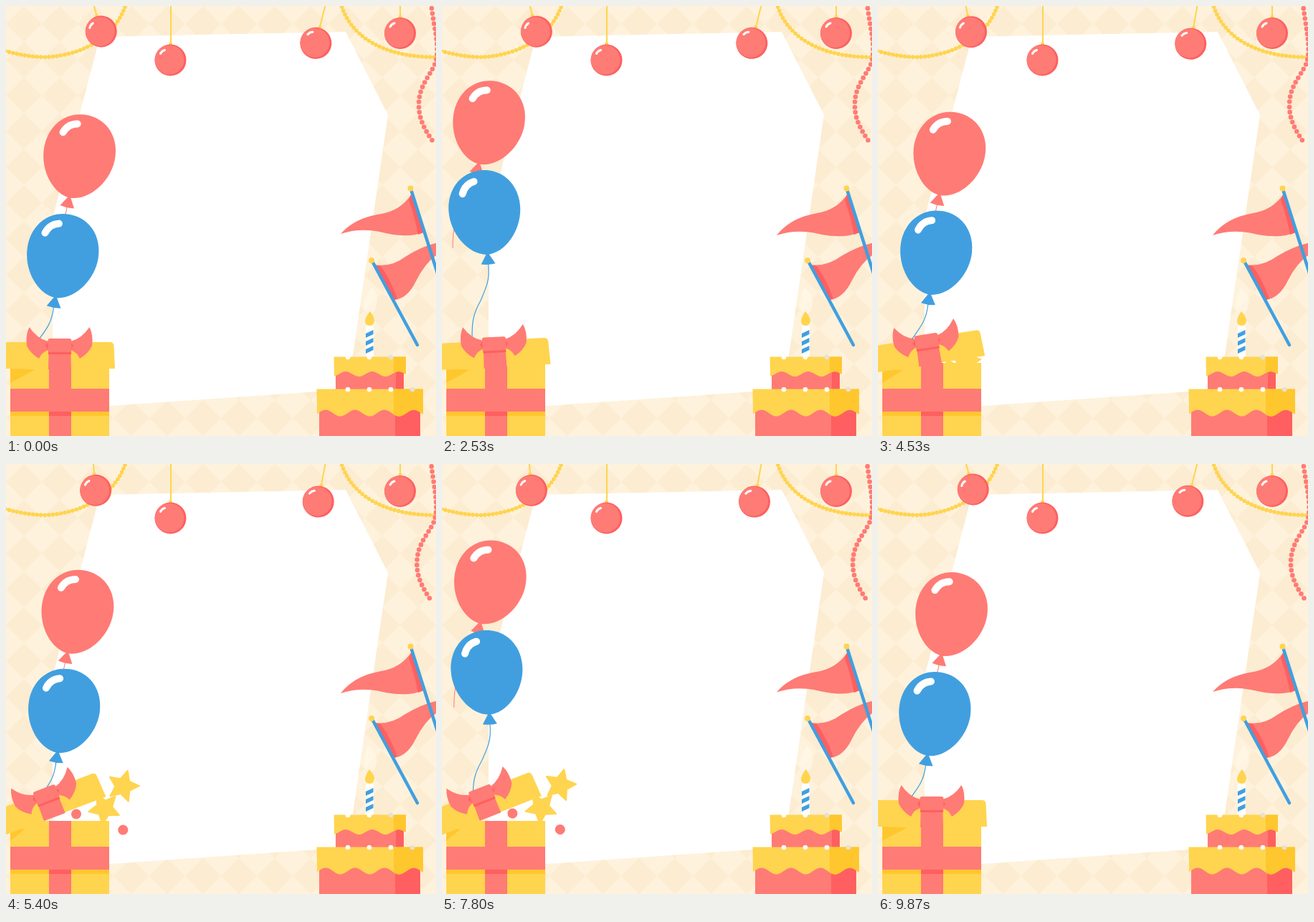
Animation, 600 px wide and 600 px high, one loop 9.94 s. Source, as an HTML page:

```html
<!DOCTYPE html>
<html lang="en">
<head>
<meta charset="utf-8">
<title>Party frame</title>
<style>
html, body { margin: 0; width: 100%; height: 100%; overflow: hidden; background: #fef2dc; }
svg { display: block; width: 100vw; height: 100vh; }
.r { fill: #ff7b75; } .rd { fill: #ff5f60; }
.y { fill: #ffd44f; } .yd { fill: #ffc72e; }
.b { fill: #419fe0; } .w { fill: #fff; }
.line { fill: none; stroke-linecap: round; stroke-linejoin: round; }
.gold { stroke: #ffd44f; } .blue { stroke: #419fe0; } .red { stroke: #ff7b75; } .white { stroke: #fff; }
</style>
</head>
<body>
<svg viewBox="0 0 600 600" preserveAspectRatio="none">
  <defs>
    <pattern id="diamonds" width="50" height="50" patternUnits="userSpaceOnUse">
      <path d="M25 0L50 25L25 50L0 25Z" fill="#fcecd1"/>
    </pattern>
    <g id="ball">
      <rect class="y" x="-2.5" y="-25" width="5" height="6" rx="2"/>
      <circle class="rd" r="22"/>
      <circle class="r" cx="-1.4" cy="-.3" r="20.4"/>
      <path class="line white" stroke-width="3" d="M-14 -9Q-12 -13 -8 -14"/>
    </g>
    <g id="body">
      <path d="M0 -59C29 -59 50 -36 50 -5C50 27 26 58 0 59C-26 58 -50 27 -50 -5C-50 -36 -29 -59 0 -59Z"/>
      <path d="M0 55L10 72Q0 74 -10 72Z"/>
      <path class="line white" stroke-width="10" d="M-29 -28Q-25 -41 -12 -44"/>
    </g>
    <path id="star" class="y" stroke="#ffd44f" stroke-width="2" stroke-linejoin="round"/>
    <clipPath id="shadeSide"><rect x="541" y="480" width="60" height="120"/></clipPath>
  </defs>

  <rect width="600" height="600" fill="#fef2dc"/>
  <rect width="600" height="600" fill="url(#diamonds)"/>
  <path class="w" d="M131 43L474 36L533 152L477 535L65 563.5V296Z"/>

  <g class="line gold">
    <g id="garland">
      <path d="M168 -4C153 42 112 66 62 71C42 72 20 69 -3 62"/>
      <path d="M467 -4C480 42 525 72 603 71.5"/>
    </g>
    <path stroke-width="2" d="M230 -2V52M550 -2V16"/>
  </g>
  <use href="#ball" x="229.5" y="75.5"/>
  <use href="#ball" x="550" y="38"/>
  <g id="swingL"><path class="line gold" stroke-width="2" d="M0 0V20"/><use href="#ball" y="42"/></g>
  <g id="swingR"><path class="line gold" stroke-width="2" d="M0 0V34"/><use href="#ball" y="56.5"/></g>

  <path id="beads" class="line red" stroke-width="6.6" stroke-dasharray="0 7.2"
    d="M593 -4C597 30 606 58 599 80C590 100 576 112 576 138C576 160 586 175 597 191"/>

  <path id="flagB" class="r"/>
  <path class="rd" d="M514 361L541 410L546 408.5Q538 384 523 363Z"/>
  <path class="line blue" stroke-width="4.5" d="M512 358L574 473"/>
  <circle class="y" cx="510" cy="355" r="4"/>
  <path id="flagA" class="r"/>
  <path class="rd" d="M566 262L582.5 316L575 319Q570 293 562 271Z"/>
  <path class="line blue" stroke-width="4.5" d="M566 259L603 376"/>
  <circle class="y" cx="564.5" cy="254.5" r="4"/>

  <path id="glow" fill="#fff6e6" opacity=".8"/>
  <path id="flame" class="y"/>
  <rect class="w" x="502" y="446" width="11" height="44" rx="2"/>
  <g id="stripes" class="b"></g>
  <g id="cake">
    <rect class="r" x="460" y="505" width="95" height="31"/>
    <rect class="rd" x="544" y="505" width="11" height="31"/>
    <rect class="r" x="437" y="560" width="141" height="42"/>
    <rect class="rd" x="543" y="560" width="35" height="42"/>
  </g>

  <g id="red">
    <path class="line red" d="M0 73C1 92 -5 110 -10 130C-15 148 -14 160 -9 181"/>
    <use href="#body" class="r"/>
  </g>
  <g id="blue">
    <path class="line blue" stroke-width="1.2" d="M0 73C1 95 -6 106 -14 122C-26 140 -30 152 -30 190"/>
    <use href="#body" class="b"/>
  </g>

  <g id="pops">
    <use href="#star"/><use href="#star"/>
    <circle class="r" r="7"/><circle class="r" r="7"/>
  </g>
  <rect class="y" x="6" y="498" width="138" height="104"/>
  <rect class="yd" x="6" y="565" width="138" height="7"/>
  <rect class="r" x="60" y="498" width="31" height="104"/>
  <rect class="rd" x="60" y="565" width="31" height="7"/>
  <rect class="r" x="6" y="534" width="138" height="32"/>
  <path id="shade" class="yd"/>
  <g id="lid">
    <path class="y" d="M1 -38H147Q152 -38 152.5 -33L154 -1H0V-37Z"/>
    <path class="r" d="M62 -38H92L93 0H61Z"/>
    <g id="wing">
      <path class="r" d="M61 -39Q45 -43 34.5 -59Q29 -48 31 -33Q36 -22 48 -15Q52 -24 61 -27Z"/>
      <path class="rd" d="M61 -38L57 -33L61 -27Z"/>
    </g>
    <use href="#wing" transform="translate(153) scale(-1 1)"/>
    <rect class="rd" x="61" y="-26" width="32" height="5"/>
    <rect class="r" x="60.5" y="-43" width="33" height="19" rx="3"/>
  </g>
</svg>
<script>
const $ = id => document.getElementById(id);
const LOOP = 4970, CYCLE = 2390;
const lerp = (a, b, k) => a + (b - a) * k;
const ease = u => (1 - Math.cos(Math.PI * Math.min(1, Math.max(0, u)))) / 2;
const set = (el, attrs) => { for (const k in attrs) el.setAttribute(k, attrs[k]); };
const place = (el, x, y, deg = 0) => set(el, { transform: `translate(${x} ${y}) rotate(${deg})` });

function add(parent, tag, attrs) {
  const el = document.createElementNS('http://www.w3.org/2000/svg', tag);
  set(el, attrs);
  parent.append(el);
}

// Rises to 1, rests there, and is back at 0 when the cycle ends.
const pulse = (c, delay, rise) => ease((c - delay) / rise) * ease((CYCLE - c) / rise);

function starPath() {
  let d = '';
  for (let i = 0; i < 10; i++) {
    const r = i % 2 ? 11 : 22.5, a = (i - 2.5) * Math.PI / 5;
    d += `${i ? 'L' : 'M'}${r * Math.cos(a)} ${r * Math.sin(a)}`;
  }
  return d + 'Z';
}

// Frosting with a wavy lower edge that is highest at x = crest.
function frosting(x0, x1, top, mid, amp, crest, period) {
  let d = `M${x0} ${top}H${x1}`;
  for (let x = x1; x >= x0; x -= 2)
    d += `L${x} ${mid - amp * Math.cos((x - crest) / period * 2 * Math.PI)}`;
  d += 'Z';
  add($('cake'), 'path', { d, class: 'y' });
  add($('cake'), 'path', { d, class: 'yd', 'clip-path': 'url(#shadeSide)' });
}

function cherries(count, y) {
  for (let i = 0; i < count; i++)
    add($('cake'), 'circle', { cx: 477 + 30 * i, cy: y, r: 3.3, fill: i === count - 1 ? '#e3e2d6' : '#fff' });
}

function build() {
  set($('star'), { d: starPath() });
  for (const p of [...$('garland').children]) {
    const dots = p.cloneNode();
    set(p, { 'stroke-width': 2 });
    set(dots, { 'stroke-width': 5.6, 'stroke-dasharray': '0 5.6' });
    $('garland').append(dots);
  }
  for (let y = 457; y < 485; y += 11)
    add($('stripes'), 'path', { d: `M502 ${y}l10.5 -5v6l-10.5 5Z` });
  frosting(457.5, 558, 489.5, 513.5, 3.5, 474, 37);
  frosting(433.5, 582, 534.5, 568, 4.5, 446, 41);
  cherries(3, 490);
  cherries(4, 535);
}

function balloons(t) {
  const d = (1 - Math.cos(2 * Math.PI * t / LOOP)) / 2;
  place($('red'), 101.5 - 37 * d, 210 - 47 * d, 13);
  place($('blue'), 78.5 - 19 * d + 50 * d * (1 - d), 349 - 61 * d, 9.5 - 13.5 * d);
}

function hangings(c) {
  place($('swingL'), 121.5, -5, lerp(-15.5, 16, pulse(c, 0, 1100)));
  place($('swingR'), 446, -3, lerp(14, -14, pulse(c, 200, 1000)));
  set($('beads'), { transform: `rotate(${4.3 * pulse(c, 140, 900)} 595 -10)` });
}

// Where each piece from the box ends up: x, y, turn.
const ends = [[175, 437, -2], [145.5, 472, 24], [101, 481, 0], [175, 506, 0]];

function gift(c) {
  const open = pulse(c, 0, 670), out = 1 - (1 - open) ** 1.7;
  place($('lid'), -2 - 3 * open, 507 + 18 * open, -29 * open);
  set($('shade'), { d: `M6 506L${lerp(41, 20, open)} ${lerp(507, 511, open)}L6 526Z` });
  set($('pops'), { visibility: open < .02 ? 'hidden' : 'visible' });
  ends.forEach(([x, y, turn], i) =>
    place($('pops').children[i], lerp(75, x, out), lerp(545, y, out), turn + 160 * (1 - out)));
}

function breeze(t) {
  const lean = Math.cos(10 * Math.PI * t / LOOP), w = (1 - lean) / 2;
  set($('flagA'), { d: `M566 262Q551 ${286 - w} 521 ${290.5 - w}Q486 296 467 ${318 + 2 * w}`
    + `Q497 ${308 + 2 * w} 530 ${317 + 2 * w}Q562 ${324 + w} 582 316Z` });
  set($('flagB'), { d: `M514 361Q537 ${365 - w} 557 ${350 - w}Q580 335 603 330V346`
    + `Q585 ${358 - w} 572 ${384 - w}Q560 ${409 - w} 541 410Z` });
  const tip = 507.5 + lean / 2, top = 508 + 3 * lean;
  set($('flame'), { d: `M${tip} 426Q514 434 514 439Q513 446 507.5 446Q501 446 501 439Q502 433 ${tip} 426Z` });
  set($('glow'), { d: `M${top} 393Q520 402 517 418Q514 430 508 430Q499 428 499 417Q500 405 ${top} 393Z` });
}

function draw(ms) {
  const t = ms % LOOP, c = t < CYCLE ? t : t - CYCLE;
  balloons(t);
  hangings(c);
  gift(c);
  breeze(t);
}

build();
function tick() {
  draw(performance.now());
  requestAnimationFrame(tick);
}
tick();
</script>
</body>
</html>
```
